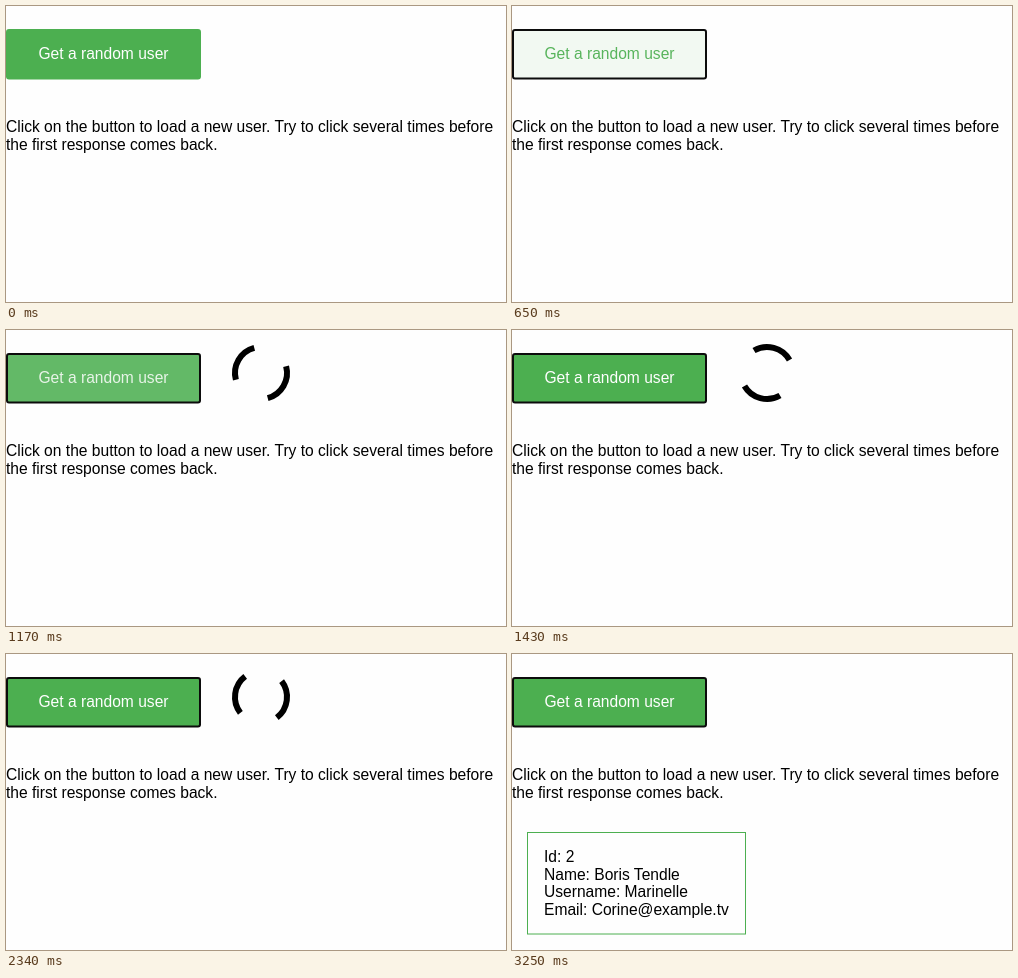
Write an HTML page that moves like this. It is 500 px wide and 296 px high and loops after 3.77 s.

```html
<!DOCTYPE html>
<html lang="en">
<head>
<meta charset="utf-8">
<title>Get a random user</title>
<style>
  html, body { margin: 0; width: 100%; height: 100%; overflow: hidden; background: #fefefe; }
  svg { display: block; font: 15.6px "Liberation Sans", Arial, sans-serif; }
</style>
</head>
<body>
<svg width="500" height="296">
  <rect id="button" x="1" y="24" width="193" height="48.5" rx="2" stroke-width="2"/>
  <text id="label" x="97.5" y="53" text-anchor="middle">Get a random user</text>
  <circle id="spinner" cx="255" cy="43" r="26" fill="none" stroke="#000" stroke-width="6"
    pathLength="4" stroke-dasharray="1 1"/>
  <text x="0" y="126">Click on the button to load a new user. Try to click several times before</text>
  <text x="0" y="143.5">the first response comes back.</text>
  <g id="card">
    <rect x="15.5" y="178.5" width="218" height="101.5" fill="none" stroke="#4caf50"/>
    <text x="32" y="208">Id: 2</text>
    <text x="32" y="225.5">Name: Boris Tendle</text>
    <text x="32" y="243">Username: Marinelle</text>
    <text x="32" y="260.5">Email: Corine@example.tv</text>
  </g>
</svg>
<script>
  const LOOP = 3770, STEP = 130;
  const PRESS = 350, FOCUS = 520, LOAD = 780, RELEASE = 910, DONE = 3250;
  const GREEN = [76, 175, 80], WHITE = [254, 254, 254];
  const [button, label, spinner, card] =
    ["button", "label", "spinner", "card"].map(id => document.getElementById(id));

  // Quick start, soft landing, over 400 ms
  function ease(ms) {
    const x = Math.min(Math.max(ms / 400, 0), 1) ** 0.6;
    return x * x * (3 - 2 * x);
  }

  const mix = (a, b, k) => `rgb(${a.map((v, i) => Math.round(v + (b[i] - v) * k))})`;
  const show = (el, on) => el.setAttribute("visibility", on ? "visible" : "hidden");

  function draw(t) {
    const pressed = ease(t - PRESS) - ease(t - RELEASE);
    button.setAttribute("fill", mix(GREEN, WHITE, pressed));
    button.setAttribute("stroke", t < FOCUS ? mix(GREEN, WHITE, 0) : "#0c0c0c");
    label.setAttribute("fill", mix(WHITE, GREEN, pressed));

    const angle = 52.5 + (t - LOAD) / STEP * 37.5;
    spinner.setAttribute("transform", `rotate(${angle} 255 43)`);
    show(spinner, t >= LOAD && t < DONE);
    show(card, t >= DONE);
  }

  const start = performance.now();
  function frame() {
    const t = (performance.now() - start) % LOOP;
    draw(Math.floor(t / STEP) * STEP);
    requestAnimationFrame(frame);
  }
  frame();
</script>
</body>
</html>
```
